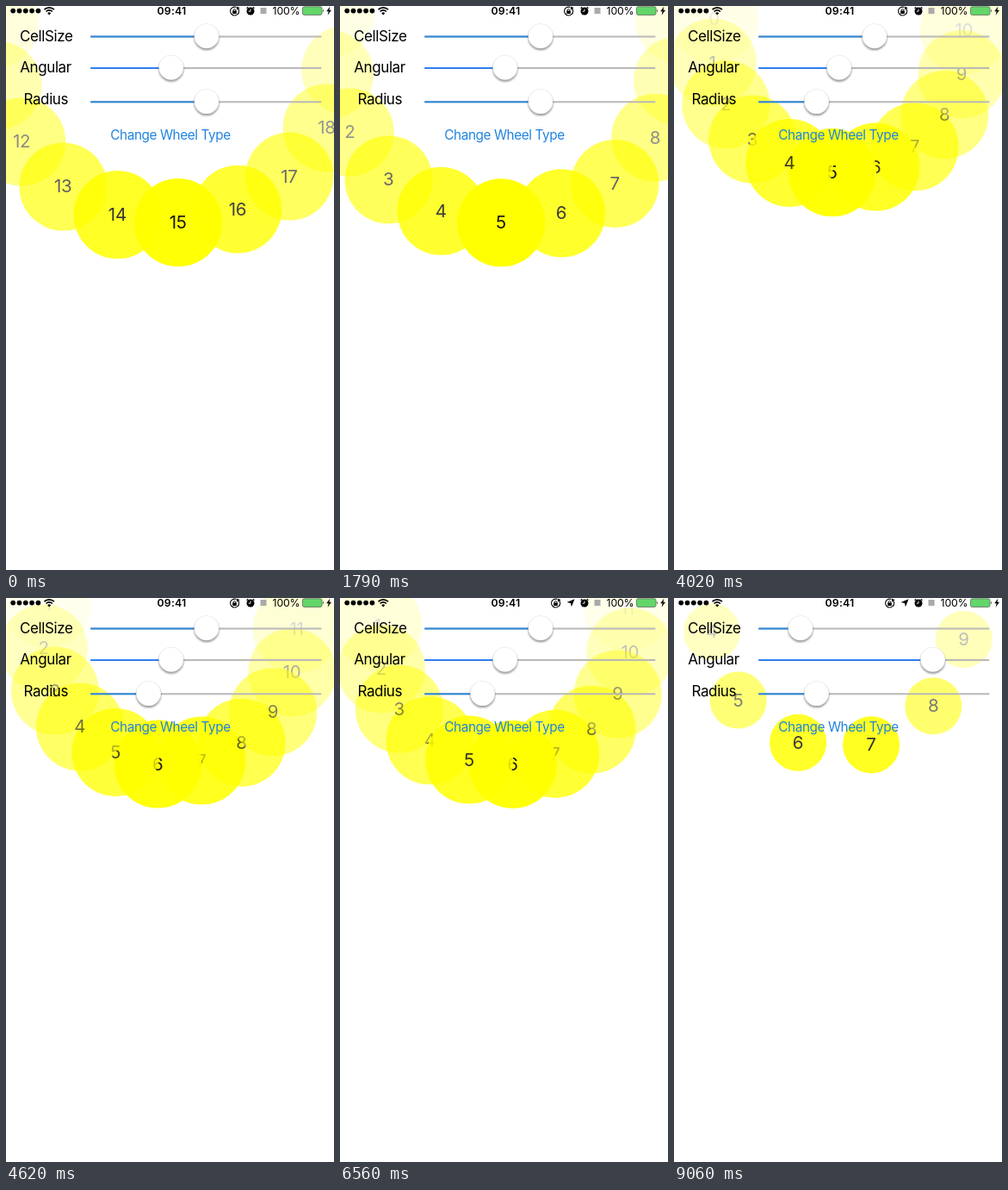
Write an HTML page that moves like this. It is 381 by 654 pixels and loops after 9210 ms.

```html
<!DOCTYPE html>
<html lang="en">
<head>
<meta charset="utf-8">
<title>Wheel</title>
<style>
  html, body { margin: 0; width: 100%; height: 100%; overflow: hidden; background: #fff; }
  body { font-family: Inter, "Liberation Sans", sans-serif; }
  #wheel, svg { position: absolute; left: 0; top: 0; width: 381px; height: 654px; overflow: hidden; }
  #wheel { isolation: isolate; }
  .cell {
    position: absolute; left: 0; top: 0; border-radius: 50%; background: #ff0;
    display: flex; align-items: center; justify-content: center;
    font-size: 20.5px; letter-spacing: -.3px; color: #111;
  }
  text { text-anchor: middle; }
  .label { font-size: 17px; letter-spacing: -.4px; }
  .button { font-size: 15.3px; letter-spacing: -.4px; fill: #1f83df; }
  .status { font-size: 12.3px; letter-spacing: -.2px; }
  .knob { fill: #fff; stroke: #0002; stroke-width: .5; filter: drop-shadow(0 2px 1.2px #0006); }
  .line { fill: none; stroke: #000; stroke-width: 1.2; }
</style>
</head>
<body>
<div id="wheel"></div>
<svg viewBox="0 0 381 654">
  <g id="dots"></g>
  <path class="line" d="M44.5 4.2a8 8 0 0 1 11.4 0M46.6 6.5a5 5 0 0 1 7.2 0" style="stroke-width:1.7"/>
  <path d="M48.2 8.2a2.9 2.9 0 0 1 4 0l-2 2.2z"/>
  <text class="status" x="192.5" y="10" font-weight="600" style="letter-spacing:.2px">09:41</text>
  <g id="lock">
    <path class="line" d="M-3.6 -3.4a5 5 0 1 0 7.6 .2"/>
    <path class="line" d="M-3.6 -3.4a5 5 0 0 1 5 -1.3"/>
    <path d="M2 -5.4l4 1.4l-3.2 2.6zM-2.3 -.4h4.6v3.4h-4.6z"/>
    <path class="line" d="M-1.3 0v-1.2a1.3 1.3 0 0 1 2.6 0V0" style="stroke-width:.9"/>
  </g>
  <path id="arrow" d="M272.5 1.2l-3.6 9l-1 -4.2l-4.4 -1z"/>
  <circle cx="284" cy="6" r="4.5"/>
  <path class="line" d="M279.6 2.8l1.6 -1.5M288.4 2.8l-1.6 -1.5"/>
  <path d="M284 3.4v2.8h-2.4" fill="none" stroke="#fff" stroke-width=".9"/>
  <rect x="295.5" y="2" width="7" height="7" fill="#aaa"/>
  <text class="status" x="325.5" y="10">100%</text>
  <rect x="344.5" y=".8" width="22.5" height="9.6" rx="1.8" fill="#62d769" stroke="#555" stroke-width=".7"/>
  <path d="M368 3.8a2.2 2.2 0 0 1 0 3.6z" fill="#555"/>
  <path d="M376.4 .6l-4.2 5.6h2.5l-1.1 4.6l4.4 -6h-2.6z"/>
  <text class="label" x="46.8" y="41">CellSize</text>
  <text class="label" x="46" y="77">Angular</text>
  <text class="label" x="46.3" y="113.6">Radius</text>
  <text class="button" x="191" y="155">Change Wheel Type</text>
  <g id="sliders"></g>
</svg>
<script>
const LOOP = 9210, STEP = 148.55, ICON_SWITCH = 5200;
const CELL_COUNT = 20, FADE_ANGLE = 112;
const byId = id => document.getElementById(id);

// Each track is a list of [time, value]; values ease between entries.
const focusTrack = [[0, 14.87], [1790, 5.05], [2250, 4.6], [3270, 4.5], [3600, 4.5],
                    [4620, 6.28], [5810, 5.82], [6800, 5.8], [7580, 6.48], [9060, 6.55]];
const cellTrack = [[8000, .502], [8950, .142]];
const angularTrack = [[6800, .33], [7500, .785]];
const radiusTrack = [[2300, .502], [3200, .22]];

function valueAt(track, t) {
  const next = track.findIndex(key => key[0] > t);
  if (next === 0) return track[0][1];
  if (next < 0) return track[track.length - 1][1];
  const [t0, a] = track[next - 1], [t1, b] = track[next];
  const p = (t - t0) / (t1 - t0);
  return a + (b - a) * p * p * (3 - 2 * p);
}

function svgNode(parent, tag, attrs) {
  const node = document.createElementNS("http://www.w3.org/2000/svg", tag);
  for (const name in attrs) node.setAttribute(name, attrs[name]);
  return parent.appendChild(node);
}

for (let i = 0; i < 5; i++) svgNode(byId("dots"), "circle", { cx: 8.2 + 7.3 * i, cy: 5.6, r: 2.9 });

function makeSlider(y, color) {
  const bar = (fill, width) =>
    svgNode(byId("sliders"), "rect", { x: 98, y: y - 1, width, height: 2, rx: 1, fill });
  bar("#b8b8b8", 268.5);
  const filled = bar(color, 0);
  const knob = svgNode(byId("sliders"), "circle", { class: "knob", cy: y - .6, r: 14.4 });
  return value => {
    const x = 113 + 239 * value;
    filled.setAttribute("width", x - 98);
    knob.setAttribute("cx", x);
  };
}
const setCell = makeSlider(35.5, "#2f88d8");
const setAngular = makeSlider(72, "#2f80f2");
const setRadius = makeSlider(111.3, "#2f88d8");

const stacking = [2, 7, 6, 4, 11, 10, 8, 9, 1, 3, 5];
const cells = Array.from({ length: CELL_COUNT }, (_, i) => {
  const cell = document.createElement("div");
  cell.className = "cell";
  cell.textContent = i;
  cell.style.zIndex = stacking.indexOf(i) + 1;
  return byId("wheel").appendChild(cell);
});

function drawWheel(t, size, spacing, radius) {
  const focus = valueAt(focusTrack, t);
  const centerY = size / 2 - 5.1;
  cells.forEach((cell, i) => {
    const degrees = (i - focus) * spacing;
    const alpha = 1 - Math.abs(degrees) / FADE_ANGLE;
    cell.style.display = alpha > 0 ? "" : "none";
    if (alpha <= 0) return;
    const angle = degrees * Math.PI / 180;
    const x = 190.5 + radius * Math.sin(angle) - size / 2;
    const y = centerY + radius * Math.cos(angle) - size / 2;
    cell.style.width = cell.style.height = size + "px";
    cell.style.transform = `translate(${x}px, ${y}px)`;
    cell.style.opacity = alpha;
  });
  cells[4].style.zIndex = t > 3600 && t < ICON_SWITCH ? 20 : 4;
}

function draw(now) {
  const t = Math.floor((now % LOOP + 3) / STEP) * STEP;
  const cell = valueAt(cellTrack, t);
  const angular = valueAt(angularTrack, t);
  const radius = valueAt(radiusTrack, t);
  setCell(cell);
  setAngular(angular);
  setRadius(radius);
  drawWheel(t, 51.3 + 100 * cell, 10 + 30 * angular, 102 + 206 * radius);

  const located = t > ICON_SWITCH;
  byId("arrow").setAttribute("visibility", located ? "visible" : "hidden");
  byId("lock").setAttribute("transform", `translate(${located ? 250.5 : 265.5} 6)`);
  requestAnimationFrame(() => draw(performance.now()));
}
draw(0);
</script>
</body>
</html>
```
